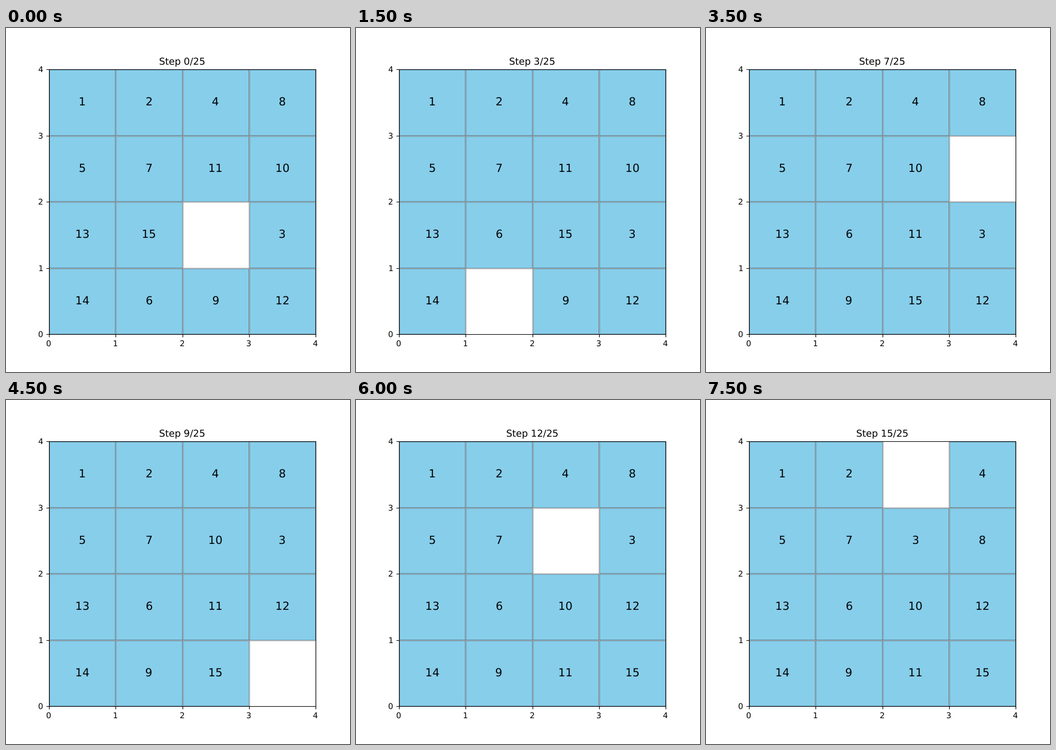
These frames come from a looping animation (600 by 600 pixels, 8000 ms). An HTML page:

```html
<!DOCTYPE html>
<html lang="en">
<head>
<meta charset="utf-8">
<title>Sliding puzzle</title>
<style>
  html, body { margin: 0; width: 100%; height: 100%; overflow: hidden; background: #fff; }
  svg { display: block; width: 600px; height: 600px; }
  text { font-family: "DejaVu Sans", Verdana, sans-serif; text-rendering: geometricPrecision; white-space: pre; }
  #tiles rect { fill: #87ceeb; stroke: #000; stroke-width: 1.389; }
  #tiles text { font-size: 19.444px; }
  #grid { stroke: #b0b0b0; stroke-width: 1.111; }
  #axes { fill: none; stroke: #000; stroke-width: 1.111; }
  #labels text { font-size: 13.889px; }
  #title { font-size: 16.667px; }
</style>
</head>
<body>
<svg viewBox="0 0 600 600">
  <clipPath id="plot"><rect x="75" y="72" width="466" height="463"/></clipPath>
  <g clip-path="url(#plot)">
    <g id="tiles"></g>
    <path id="grid"/>
  </g>
  <path id="axes"/>
  <g id="labels"></g>
  <text id="title" y="64"></text>
</svg>
<script>
const STEP_MS = 500, STEPS = 16;
const START = [1, 2, 4, 8, 5, 7, 11, 10, 13, 15, 0, 3, 14, 6, 9, 12];
// Direction the gap travels at each step; "." keeps the board still.
const MOVES = "..LDRUURDDLUURUL";
const OFFSET = { L: -1, R: 1, U: -4, D: 4, ".": 0 };

const DIGIT_ADVANCE = 0.636;
// Left side bearing of the digits 0-9, in em.
const BEARING = [.066, .11, .073, .076, .049, .108, .07, .082, .068, .063];

const $ = id => document.getElementById(id);
const px = col => 75 + 116.25 * col;
const py = row => 72 + 115.5 * row;
const snap = v => Math.floor(v + 0.5) + 0.5;

// Centred text start, shifted so the ink begins on a whole pixel.
const textStart = (centre, width, bearing) =>
  Math.round(centre - width / 2 + bearing) - bearing;

function number(n, cx, baseline, size) {
  const s = String(n);
  const x = textStart(cx, s.length * DIGIT_ADVANCE * size, BEARING[s[0]] * size);
  return `<text x="${x.toFixed(2)}" y="${Math.round(baseline)}">${s}</text>`;
}

function tile(n, i) {
  if (!n) return "";
  const col = i % 4, row = i >> 2;
  const x = snap(px(col)), y = snap(py(row));
  const w = snap(px(col + 1)) - x, h = snap(py(row + 1)) - y;
  return `<rect x="${x}" y="${y}" width="${w}" height="${h}"/>` +
    number(n, px(col + 0.5), py(row + 0.5) + 5.4, 19.444);
}

function boardAt(step) {
  const board = START.slice();
  let gap = board.indexOf(0);
  for (const move of MOVES.slice(0, step + 1)) {
    const next = gap + OFFSET[move];
    [board[gap], board[next]] = [board[next], board[gap]];
    gap = next;
  }
  return board;
}

function drawAxes() {
  let grid = "", axes = "M75.5 72.5H540.5V534.5H75.5Z", labels = "";
  for (let k = 0; k <= 4; k++) {
    const x = snap(px(k)), y = snap(py(k));
    grid += `M${x} 72V535M75 ${y}H541`;
    axes += `M${x} 534.5v5M75.5 ${y}h-5`;
    labels += number(k, px(k), 555, 13.889) +
      number(4 - k, 60.86, py(k) + 5.3, 13.889);
  }
  $("grid").setAttribute("d", grid);
  $("axes").setAttribute("d", axes);
  $("labels").innerHTML = labels;
}

function drawStep(step) {
  $("tiles").innerHTML = boardAt(step).map(tile).join("");
  const width = (step < 10 ? 4.84 : 4.84 + DIGIT_ADVANCE) * 16.667;
  $("title").setAttribute("x", textStart(307.5, width, 1.1));
  $("title").textContent = `Step ${step}/25`;
}

let shown = -1;
function tick() {
  const step = Math.floor(performance.now() / STEP_MS) % STEPS;
  if (step !== shown) drawStep(shown = step);
  requestAnimationFrame(tick);
}

drawAxes();
tick();
</script>
</body>
</html>
```
